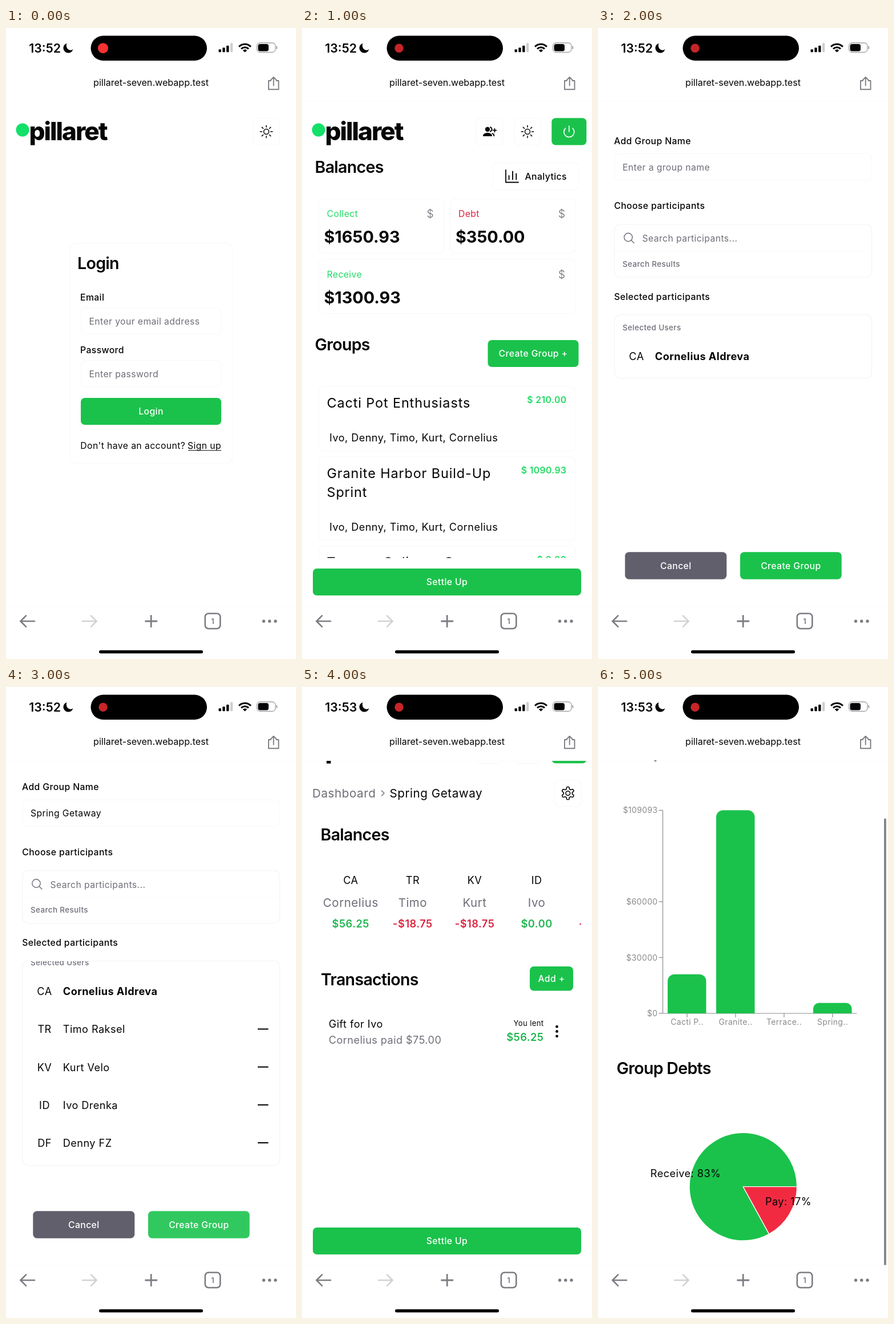
Recreate the animation shown at these times as an HTML page with a canvas. Size 508 by 1102 pixels, loop 6000 ms.

```html
<!DOCTYPE html>
<html lang="en">
<head>
<meta charset="utf-8">
<title>Shared expenses</title>
<style>
html, body { margin: 0; width: 100%; height: 100%; overflow: hidden; background: #fff; }
canvas { display: block; width: 508px; height: 1102px; }
</style>
</head>
<body>
<canvas id="stage"></canvas>
<script>
const W = 508, H = 1102;
const canvas = document.getElementById('stage');
const dpr = window.devicePixelRatio || 1;
canvas.width = W * dpr;
canvas.height = H * dpr;
const c = canvas.getContext('2d');

const GREEN = '#1ac24b', LIME = '#20dc64', RED = '#dc2540', INK = '#050507';
const GRAY = '#6f6e78', FAINT = '#f8f8f9', EDGE = '#f3f3f5', ICON = '#7d7c83';
const BODY = 15.75, NAME = 18.1, HEAD = 28.6;

// Text whose capitals are centred on y
function text(str, x, y, size = BODY, { weight = 400, color = INK, align = 'left', track = 0.025 } = {}) {
  c.font = `${weight} ${size}px Inter, sans-serif`;
  c.letterSpacing = `${track * size}px`;
  c.textAlign = align;
  c.fillStyle = color;
  c.fillText(str, x, y + size * 0.364);
}

const heading = (str, x, y) => text(str, x, y, HEAD, { weight: 600, track: -0.025 });
const label = (str, x, y) => text(str, x, y, BODY, { weight: 500 });

function fillBox(x, y, w, h, r, color) {
  c.beginPath();
  c.roundRect(x, y, w, h, r);
  c.fillStyle = color;
  c.fill();
}

function outline(x, y, w, h, r = 9, color = FAINT, width = 1.2) {
  c.beginPath();
  c.roundRect(x, y, w, h, r);
  c.strokeStyle = color;
  c.lineWidth = width;
  c.stroke();
}

function dot(x, y, r, color) {
  c.beginPath();
  c.arc(x, y, r, 0, Math.PI * 2);
  c.fillStyle = color;
  c.fill();
}

function ring(x, y, r, color, width) {
  c.beginPath();
  c.arc(x, y, r, 0, Math.PI * 2);
  c.strokeStyle = color;
  c.lineWidth = width;
  c.stroke();
}

function path(points, color, width, cap = 'round') {
  c.beginPath();
  for (let i = 0; i < points.length; i += 2) c.lineTo(points[i], points[i + 1]);
  c.strokeStyle = color;
  c.lineWidth = width;
  c.lineCap = cap;
  c.lineJoin = 'round';
  c.stroke();
}

function button(str, x, y, w, h, color = GREEN) {
  fillBox(x, y, w, h, 7, color);
  text(str, x + w / 2, y + h / 2, BODY, { weight: 500, color: '#fff', align: 'center' });
}

function clipped(x, y, w, h, draw) {
  c.save();
  c.beginPath();
  c.rect(x, y, w, h);
  c.clip();
  draw();
  c.restore();
}

function statusBar(time, glow) {
  text(time, 40.3, 35, 21.3, { weight: 600, track: 0 });
  c.beginPath();
  c.arc(109, 35, 8.6, -1.85, 0.25, true);
  c.quadraticCurveTo(112, 41, 107.5, 36);
  c.quadraticCurveTo(104.5, 31, 106.6, 26.7);
  c.fillStyle = INK;
  c.fill();
  fillBox(148.5, 13.5, 203.5, 43.5, 21.7, '#000');
  dot(170, 35.2, glow ? 9 : 7.7, glow ? '#f63232' : '#c62528');
  [5, 8, 11.5, 16].forEach((h, i) =>
    fillBox(372.5 + i * 6.8, 42.2 - h, 4.4, h, 1.2, i < 3 ? INK : '#cfcfd1'));
  c.lineCap = 'butt';
  for (const r of [8.8, 14.2]) {
    c.beginPath();
    c.arc(418.5, 42.5, r, -Math.PI * 0.76, -Math.PI * 0.24);
    c.strokeStyle = INK;
    c.lineWidth = 3;
    c.stroke();
  }
  c.beginPath();
  c.moveTo(418.5, 42.5);
  c.arc(418.5, 42.5, 5, -Math.PI * 0.76, -Math.PI * 0.24);
  c.fillStyle = INK;
  c.fill();
  outline(439.5, 26, 32.5, 16.5, 5.5, '#a3a3a6', 1.3);
  fillBox(441.5, 28, 18.5, 12.5, 3.5, INK);
  fillBox(473.3, 31.6, 1.9, 5.4, 1, '#a3a3a6');
}

function browser(time, glow) {
  statusBar(time, glow);
  text('pillaret-seven.webapp.test', 254, 95.5, 16.1, { align: 'center', track: 0 });
  path([464, 92, 460, 92, 460, 107.3, 477.5, 107.3, 477.5, 92, 473.5, 92], ICON, 1.9);
  path([468.7, 100.5, 468.7, 86], ICON, 1.9);
  path([464, 90.5, 468.7, 86, 473.4, 90.5], ICON, 1.9);

  path([0, 1010, W, 1010], '#fbfbfb', 1);
  path([50, 1036, 25.5, 1036], ICON, 2.6);
  path([35, 1026.3, 25.5, 1036, 35, 1045.7], ICON, 2.6);
  path([134, 1036, 158.5, 1036], '#d2d2d5', 2.6);
  path([149, 1026.3, 158.5, 1036, 149, 1045.7], '#d2d2d5', 2.6);
  path([244.5, 1036, 264, 1036], ICON, 2.8);
  path([254.2, 1026.3, 254.2, 1045.7], ICON, 2.8);
  outline(348.8, 1022.5, 26.5, 26.5, 6, ICON, 2.6);
  text('1', 362, 1036, 13, { weight: 600, color: ICON, align: 'center', track: 0 });
  for (const x of [451.5, 461.7, 472]) dot(x, 1036, 2.7, ICON);
  fillBox(163, 1086.8, 182, 5.4, 2.7, '#000');
}

function logo() {
  dot(29, 178, 11.5, '#12e069');
  text('pillaret', 40.5, 179.8, 44, { weight: 800, track: -0.045 });
}

function sun(x, y) {
  outline(x - 23, y - 23.5, 46, 47, 8);
  ring(x, y, 4.5, INK, 1.5);
  for (let i = 0; i < 8; i++) {
    const u = Math.cos(i * Math.PI / 4), v = Math.sin(i * Math.PI / 4);
    path([x + u * 7.7, y + v * 7.7, x + u * 10.8, y + v * 10.8], INK, 1.5);
  }
}

function people() {
  outline(305, 157.5, 47, 47, 8);
  dot(325, 177, 4.2, INK);
  c.beginPath();
  c.moveTo(317, 189);
  c.bezierCurveTo(316.5, 181, 333.5, 181, 333, 189);
  c.fill();
  c.beginPath();
  c.arc(328.5, 177, 4, -1.2, 1.2);
  c.strokeStyle = INK;
  c.lineWidth = 2;
  c.stroke();
  path([333.5, 184.2, 336, 186, 336.2, 188.2], INK, 2);
  path([334.7, 178.7, 340.3, 178.7], INK, 1.8);
  path([337.5, 175.9, 337.5, 181.5], INK, 1.8);
}

function header() {
  logo();
  people();
  sun(395, 181);
  fillBox(437.3, 157.3, 61, 47.2, 7, GREEN);
  c.beginPath();
  c.arc(467.8, 181.5, 9, -Math.PI / 4, Math.PI * 1.25);
  c.strokeStyle = '#fff';
  c.lineWidth = 1.6;
  c.stroke();
  path([467.8, 171, 467.8, 181], '#fff', 1.6);
}

function loginPage() {
  logo();
  sun(456, 181);
  outline(111.5, 376, 285, 384, 11);
  heading('Login', 125, 410.5);
  label('Email', 130, 470.5);
  outline(131.5, 488.5, 245, 46, 7);
  text('Enter your email address', 145.5, 512, BODY, { color: GRAY });
  label('Password', 130, 562.5);
  outline(131.5, 580.5, 245, 46, 7);
  text('Enter password', 145.5, 604, BODY, { color: GRAY });
  button('Login', 131, 646, 246, 47);
  text("Don't have an account?", 130.3, 729.5);
  text('Sign up', 318, 729.5);
  path([319, 737.8, 377, 737.8], INK, 1.1, 'butt');
}

function moneyCard(x, y, w, name, amount, color) {
  outline(x, y, w, 95, 9);
  text(name, x + 14.5, y + 26.5, BODY, { color });
  text('$', x + w - 24.5, y + 26, 19, { weight: 300, color: '#66656e', align: 'center', track: 0 });
  text(amount, x + 9.5, y + 67, 28.8, { weight: 700, track: 0 });
}

const MEMBERS = 'Ivo, Denny, Timo, Kurt, Cornelius';

function groupCard(y, h, lines, amount) {
  outline(29, y, 450.5, h, 9);
  lines.forEach((s, i) => text(s, 43.5, y + 28 + i * 33, 23.4, { track: 0.038 }));
  text(amount, 463.5, y + 23.5, BODY, { weight: 600, color: LIME, align: 'right' });
  text(MEMBERS, 48, y + h - 24, NAME);
}

function homePage() {
  header();
  heading('Balances', 22.5, 242.8);
  outline(333.5, 235.5, 151, 47, 7);
  path([357, 248, 357, 269.5, 379, 269.5], INK, 1.8);
  [[362.6, 258], [369, 250.5], [375.3, 254.5]].forEach(([x, y]) => path([x, y, x, 264.5], INK, 1.9));
  label('Analytics', 390.5, 259.5);
  moneyCard(29, 298, 220, 'Collect', '$1650.93', LIME);
  moneyCard(259.5, 298, 220, 'Debt', '$350.00', RED);
  moneyCard(29, 404, 450.5, 'Receive', '$1300.93', LIME);
  heading('Groups', 22.5, 552.8);
  button('Create Group +', 325.5, 545, 159, 47);
  clipped(0, 600, W, 325.5, () => {
    groupCard(626, 113, ['Cacti Pot Enthusiasts'], '$ 210.00');
    groupCard(749, 146, ['Granite Harbor Build-Up', 'Sprint'], '$ 1090.93');
    groupCard(904.5, 113, ['Terrace Culinary Crew'], '$ 0.00');
  });
  button('Settle Up', 19, 944, 470, 47);
}

function formPage(shift, name, boxHeight, buttonColor) {
  c.save();
  c.translate(0, shift);
  label('Add Group Name', 28, 196.8);
  outline(29, 219.5, 450.5, 46.5, 8);
  text(name || 'Enter a group name', 43, 243, BODY, { color: name ? INK : GRAY });
  label('Choose participants', 28.2, 310.3);
  outline(29, 343, 450.5, 92, 10, EDGE);
  path([30, 390, 479, 390], '#fafafb', 1);
  ring(53, 365.5, 7.2, GRAY, 1.4);
  path([58.2, 370.7, 63, 375.5], GRAY, 1.4);
  text('Search participants...', 77.5, 367.3, BODY, { color: GRAY });
  text('Search Results', 43, 411.8, 13.5, { weight: 500, color: GRAY });
  label('Selected participants', 28.2, 468.8);
  outline(29, 501, 450.5, boxHeight, 10, EDGE);
  c.restore();
  button('Cancel', 47.3, 915.3, 178, 47.4, '#615f6c');
  button('Create Group', 249, 915.3, 177.7, 47.4, buttonColor);
}

function memberRow(initials, name, y, owner) {
  text(initials, 67.5, y, NAME, { align: 'center' });
  text(name, 99.8, y, NAME, { weight: owner ? 700 : 400 });
  if (!owner) path([441, y - 0.5, 459.5, y - 0.5], INK, 2.1, 'butt');
}

const selectedUsers = y => text('Selected Users', 43, y, 13.5, { weight: 500, color: GRAY });

function emptyForm() {
  formPage(0, '', 110.5, GREEN);
  selectedUsers(522.8);
  memberRow('CA', 'Cornelius Aldreva', 573, true);
}

function filledForm() {
  formPage(-22.5, 'Spring Getaway', 357, '#31c95f');
  clipped(29, 479, 451, 357, () => selectedUsers(481.5));
  [['CA', 'Cornelius Aldreva'], ['TR', 'Timo Raksel'], ['KV', 'Kurt Velo'], ['ID', 'Ivo Drenka'], ['DF', 'Denny FZ']]
    .forEach(([a, b], i) => memberRow(a, b, 531.7 + i * 66.2, i === 0));
}

function gear(x, y) {
  c.beginPath();
  for (let i = 0; i <= 120; i++) {
    const a = i * Math.PI / 60;
    const r = 9.3 + 1.7 * Math.max(-1, Math.min(1, -1.7 * Math.cos(6 * a)));
    c.lineTo(x + r * Math.cos(a), y + r * Math.sin(a));
  }
  c.closePath();
  c.strokeStyle = INK;
  c.lineWidth = 1.6;
  c.stroke();
  ring(x, y, 3.8, INK, 1.6);
}

function groupPage() {
  clipped(0, 129, W, 20, () => {
    c.translate(0, -71.3);
    header();
  });
  text('Dashboard', 18, 185.5, 20.7, { color: GRAY });
  path([139.5, 181, 144, 185.5, 139.5, 190], GRAY, 1.4);
  text('Spring Getaway', 153.5, 185.5, 20.7);
  outline(442.5, 162, 46.5, 46.5, 8);
  gear(465.8, 185.5);
  heading('Balances', 32.5, 257.2);
  clipped(0, 300, 489, 140, () => {
    [['CA', 'Cornelius', '$56.25'], ['TR', 'Timo', '-$18.75'], ['KV', 'Kurt', '-$18.75'],
     ['ID', 'Ivo', '$0.00'], ['DF', 'Denny', '-$18.75']].forEach(([a, b, sum], i) => {
      const x = 85.3 + i * 108.6;
      text(a, x, 337.5, NAME, { align: 'center' });
      text(b, x, 377, 20.5, { color: GRAY, align: 'center' });
      text(sum, x, 413, 18.3, { weight: 600, color: sum[0] === '-' ? RED : '#1fb650', align: 'center' });
    });
  });
  heading('Transactions', 33, 510.2);
  button('Add +', 399, 488, 76, 42.5);
  text('Gift for Ivo', 46.8, 588, NAME);
  text('Cornelius paid $75.00', 46.8, 616.5, NAME, { color: GRAY });
  text('You lent', 423.5, 587.5, 13.2, { align: 'right' });
  text('$56.25', 423.5, 611.5, 18.3, { weight: 600, color: '#1fb650', align: 'right' });
  for (const y of [593.2, 601.5, 609.8]) dot(446.5, y, 2.4, INK);
  button('Settle Up', 19, 944, 470, 47);
}

function barChart() {
  const max = 109093, base = 570, height = 354.7, axis = '#8b8b8f';
  const rise = v => v / max * height;
  const style = { color: '#8a8a8e' };
  path([113.5, base - height, 113.5, base], axis, 1.2, 'butt');
  path([113.5, base, 453.5, base], axis, 1.2, 'butt');
  for (const v of [0, 30000, 60000, max]) {
    const y = base - rise(v);
    path([106.5, y, 113.5, y], axis, 1.2, 'butt');
    text('$' + v, 104.5, y, 14, { ...style, align: 'right' });
  }
  [['Cacti P..', 21000], ['Granite..', max], ['Terrace..', 0], ['Spring..', 5625]].forEach(([name, v], i) => {
    const x = 156 + i * 85, h = rise(v), r = Math.min(12, h * 0.55);
    if (v) fillBox(x - 34, base - h, 67.5, h, [r, r, 0, 0], GREEN);
    path([x, base, x, base + 7], axis, 1.2, 'butt');
    text(name, x, 585, 14, { ...style, align: 'center' });
  });
}

function slice(from, to, color) {
  c.beginPath();
  c.moveTo(254.3, 872.7);
  c.arc(254.3, 872.7, 94.3, from, to);
  c.closePath();
  c.fillStyle = color;
  c.fill();
  c.strokeStyle = '#fff';
  c.lineWidth = 1.3;
  c.lineJoin = 'round';
  c.stroke();
}

function analyticsPage() {
  clipped(0, 128.5, W, 20, () => heading('Group Collects', 32.5, 113.5));
  barChart();
  heading('Group Debts', 32.5, 665.5);
  const split = Math.PI * 2 * 0.17;
  slice(split, Math.PI * 2, GREEN);
  slice(0, split, '#f22a41');
  text('Receive: 83%', 91.8, 849.5, NAME);
  text('Pay: 17%', 293, 898, NAME);
  fillBox(501, 229.5, 3.8, 780.5, [1.9, 1.9, 0, 0], '#838387');
}

const pages = [loginPage, homePage, emptyForm, filledForm, groupPage, analyticsPage];
const HOLD = 1000;
let shown = -1;

function render(i) {
  c.setTransform(dpr, 0, 0, dpr, 0, 0);
  c.fillStyle = '#fff';
  c.fillRect(0, 0, W, H);
  if (i > 0) path([0, 128, W, 128], '#fafafa', 1);
  pages[i]();
  browser(i < 4 ? '13:52' : '13:53', i === 0);
}

const start = performance.now();
function tick() {
  const i = Math.floor((performance.now() - start) / HOLD) % pages.length;
  if (i !== shown) render(shown = i);
  requestAnimationFrame(tick);
}
tick();
</script>
</body>
</html>
```
